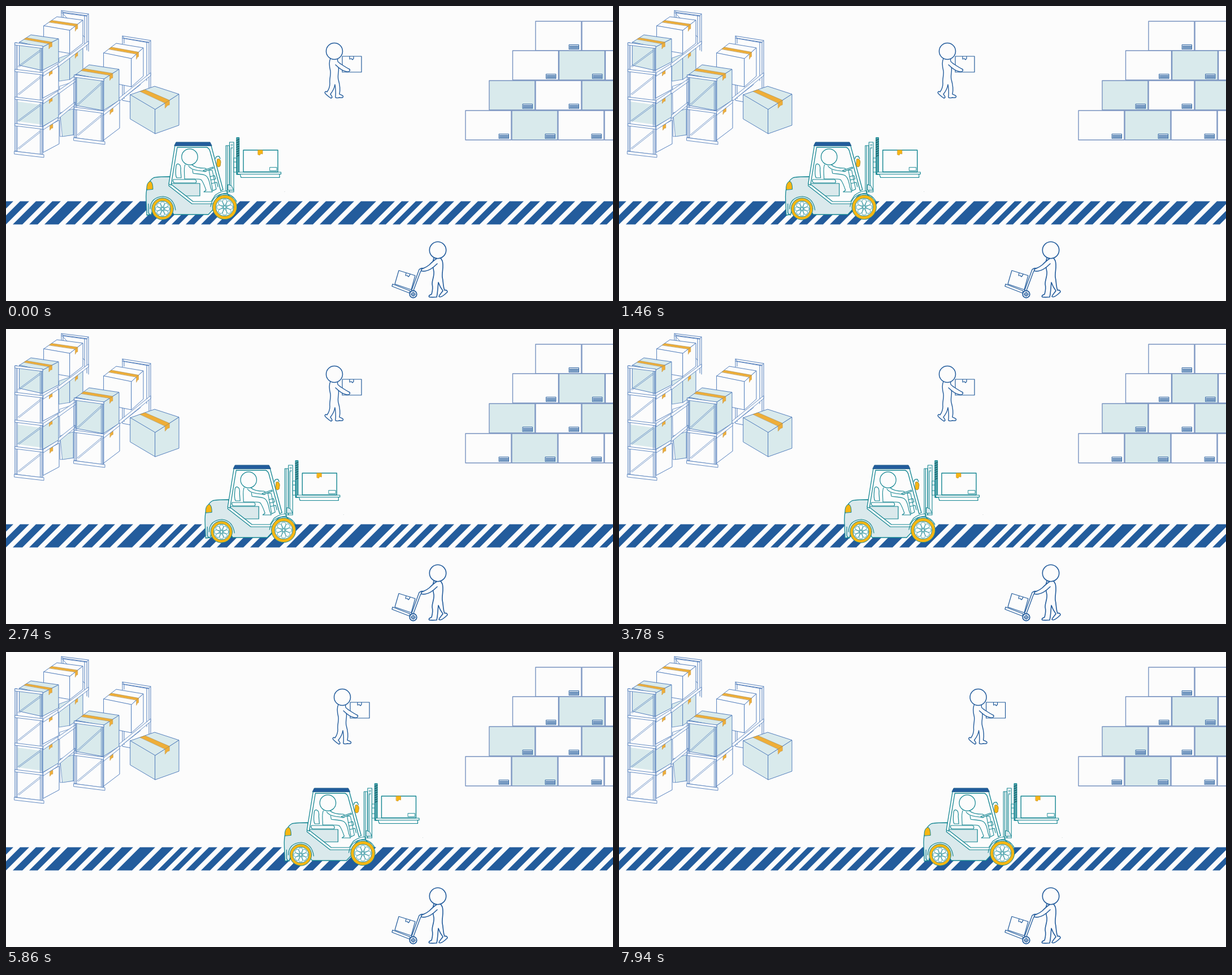
Animation, 1074 px wide and 522 px high, one loop 8000 ms. Source, as an HTML page with a canvas:

```html
<!DOCTYPE html>
<html lang="en">
<head>
<meta charset="utf-8">
<title>Warehouse</title>
<style>
html, body { margin: 0; width: 100%; height: 100%; overflow: hidden; background: #fcfcfc; }
canvas { display: block; }
</style>
</head>
<body>
<canvas id="stage" width="1074" height="522"></canvas>
<script>
const ctx = document.getElementById('stage').getContext('2d');
const PAPER = '#fcfcfc', PALE = '#d9eaec', NAVY = '#235c9c', SHELF = '#5580bd',
      TEAL = '#148692', BODY = '#dae9ec', YELLOW = '#f8b613', TAPE = '#efae38';

function shape(d, fill, stroke, width = 1) {
  const path = new Path2D(d);
  if (fill) { ctx.fillStyle = fill; ctx.fill(path); }
  if (stroke) { ctx.strokeStyle = stroke; ctx.lineWidth = width; ctx.stroke(path); }
}

function circle(x, y, r, fill, stroke, width = 1) {
  ctx.beginPath();
  ctx.arc(x, y, r, 0, Math.PI * 2);
  if (fill) { ctx.fillStyle = fill; ctx.fill(); }
  if (stroke) { ctx.strokeStyle = stroke; ctx.lineWidth = width; ctx.stroke(); }
}

const poly = points => 'M' + points.map(p => p.join()).join('L') + 'Z';
const mix = (a, b, k) => [a[0] + (b[0] - a[0]) * k, a[1] + (b[1] - a[1]) * k];
const down = (p, h) => [p[0], p[1] + h];

// Side of a box facing right, with a flap of tape at its top edge.
function boxSide(front, right, height, fill, farHeight = height) {
  shape(poly([front, right, down(right, farHeight), down(front, height)]), fill, SHELF);
  const a = mix(front, right, .42), b = mix(front, right, .6);
  shape(poly([a, b, down(b, 8), down(mix(a, b, .5), 7), down(a, 9)]), TAPE, '#c79440', .6);
}

function isoBox(left, back, right, front, height, fill, farHeight) {
  shape(poly([left, back, right, front]), fill, SHELF);
  shape(poly([left, front, down(front, height), down(left, height)]), fill, SHELF);
  boxSide(front, right, height, fill, farHeight);
  shape(poly([mix(left, back, .4), mix(left, back, .6), mix(front, right, .6), mix(front, right, .42)]),
    TAPE, '#a08a58', .6);
}

// Upright frame with a crossbar at each level; bars drop by `tilt` to the right.
function rack(x0, x1, tilt, levels) {
  const top = levels[0], bottom = levels[levels.length - 1];
  for (const [x, dy] of [[x0, 0], [x1 - 4, tilt]])
    shape(`M${x},${top + dy}h4V${bottom + dy}h-4Z M${x + 2},${top + dy}V${bottom + dy}`, null, SHELF, .9);
  levels.forEach((y, i) => {
    shape(`M${x0},${y}L${x1},${y + tilt}v4L${x0},${y + 4}Z`, PAPER, SHELF, .9);
    if (i) {
      const y0 = levels[i - 1];
      shape(`M${x0 + 5},${y - 5}L${x1 - 5},${y0 + tilt + 7}M${x0 + 7},${y - 4}L${x1 - 4},${y0 + tilt + 9}`, null, SHELF, .8);
    }
  });
  shape(`M${x0 - 1},${bottom}L${x1 + 2},${bottom + tilt}v5L${x0 - 1},${bottom + 5}Z`, PAPER, SHELF, .9);
}

function beam(x0, y0, x1, y1) {
  shape(`M${x0},${y0}L${x1},${y1}v5L${x0},${y0 + 6}Z`, PAPER, SHELF, .9);
}

function drawShelves() {
  shape('M98,24V8L146,14V80M101,22V11L143,17V78M98,8L101,11M146,14L143,17M139,18V70M98,12L143,18M101,14L139,55', null, SHELF);
  isoBox([67, 35], [90, 19], [136, 25], [113, 43], 41, PAPER);
  shape('M94,92L113,85V130L94,133Z', PALE, SHELF, .8);
  boxSide([113, 90], [136, 74], 40, PALE);
  shape('M95,142L120,134V228L96,231Z', PAPER, SHELF, .8);
  shape('M96,189L119,182V228L100,231Z', PALE, SHELF, .8);
  beam(92, 102, 146, 62);
  beam(92, 150, 124, 128);
  beam(92, 194, 122, 170);

  boxSide([66, 217], [94, 202], 42, PAPER);
  boxSide([65, 170], [93, 154], 43, PALE);
  shape('M20,169L64,175V210L20,204Z', PALE);
  boxSide([65, 121], [93, 106], 42, PAPER);
  isoBox([24, 64], [44, 51], [93, 58], [64, 73], 41, PALE);
  rack(16, 65, 6, [65, 112, 161, 208, 257]);
  beam(66, 118, 92, 102);
  beam(66, 167, 92, 150);
  beam(66, 213, 92, 197);

  shape('M206,68V53L256,61V151M209,66V57L253,64V148M206,53L209,57M256,61L253,64M249,65V132M206,57L252,65M206,132V167L222,170M209,134V164M206,164L238,139', null, SHELF);
  beam(200, 163, 256, 118);
  isoBox([173, 83], [195, 66], [243, 74], [222, 93], 50, PAPER);
  boxSide([172, 192], [201, 170], 46, PAPER);
  isoBox([124, 121], [147, 104], [200, 112], [172, 130], 55, PALE);
  rack(121, 173, 7, [122, 179, 233]);
  beam(173, 187, 201, 166);
  isoBox([220, 157], [263, 142], [306, 156], [264, 183], 43, PALE, 55);
}

function drawStack() {
  const line = '#7893c0';
  // x of the first carton, top y, and which carton is tinted
  const rows = [[937, 27, -1], [896.5, 79, 1], [855, 132, 0], [813, 185, 1]];
  rows.forEach(([x0, y, tint], row) => {
    for (let i = 0; x0 + i * 82 < 1074; i++) {
      const x = x0 + i * 82, pale = i === tint || (row === 2 && i === 2);
      shape(`M${x},${y}h81v52h-81Z`, pale ? PALE : PAPER, line, 1.4);
      const lx = x + 59.5, ly = y + 41.5;
      shape(`M${lx},${ly}h17v8h-17Z`, '#dfe7f1', NAVY, .9);
      shape(`M${lx + 1},${ly + 3}h15M${lx + 1},${ly + 5.7}h15`, null, NAVY, 1.5);
    }
  });
}

// Slanted stripes: one irregular set of right-hand edges, repeated along the road.
function drawRoad() {
  const edges = [41, 70, 97, 134, 163, 193, 225, 264, 297, 322, 347, 374, 402];
  const period = 391, gap = 12;
  let start = -18;
  const stripe = end => {
    shape(`M${start},345.5H${end}l-41,41H${start - 41}Z`, NAVY);
    start = end + gap;
  };
  stripe(13);
  for (let x = 0; x < 1100; x += period) edges.forEach(edge => stripe(x + edge));
}

function drawCarrier(dx) {
  ctx.save();
  ctx.translate(dx, 0);
  shape('M595,89H629V117H595Z M608,89v5l3,-1l2,2l2,-2v-4', PAPER, NAVY, 1.2);
  shape('M574,93C571,99 572,107 574,115C575,122 572,129 573,137C573,144 571,148 568,152' +
    'C565,150 563,153 565,155C568,158 571,161 575,163C579,162 576,159 574,156C578,151 581,146 582,139' +
    'C583,145 584,151 583,160C582,163 586,163 590,162C594,163 598,162 596,159C594,157 591,157 590,156' +
    'C592,147 590,137 588,130C586,122 590,115 588,107', PAPER, NAVY, 1.4);
  shape('M587,94C585,98 589,100 593,103C599,107 604,110 608,112C610,115 606,117 602,116C596,115 588,109 583,104', PAPER, NAVY, 1.4);
  circle(581, 80, 14.5, PAPER, NAVY, 1.5);
  ctx.restore();
}

function drawCartPusher() {
  shape('M695,468L724,477L717,502L688,492Z M708,472l-1,5l3,0l2,2l2,-2l1,-3', PAPER, NAVY, 1.2);
  shape('M684,492L715,504L714,508L683,496Z', PAPER, NAVY, 1.2);
  shape('M717,505L730,469Q731,464 737,464L742,465M720,506L733,471Q734,467 741,468', null, NAVY, 1.3);
  circle(720.5, 510, 6.3, PAPER, NAVY, 1.7);
  circle(720.5, 510, 3, null, NAVY, 1.2);
  shape('M716,510h9M720.5,506v8', null, NAVY, .9);
  shape('M757,446C754,454 755,462 757,470C758,478 754,484 754,492C756,500 754,506 753,510' +
    'C750,511 747,513 749,515C753,516 758,515 762,515C764,507 764,497 765,489' +
    'C767,495 770,500 773,504C770,508 767,511 766,514C769,517 777,510 781,506C781,503 778,502 776,503' +
    'C773,496 774,488 772,480C771,471 775,461 772,451L769,446', PAPER, NAVY, 1.6);
  shape('M762,447C757,450 753,454 749,458C743,463 738,464 735,466C733,469 738,470 742,469C750,468 758,461 763,456', PAPER, NAVY, 1.6);
  circle(764, 432, 14.7, PAPER, NAVY, 1.6);
}

function wheel(x, y, r, hub) {
  circle(x, y, r, YELLOW, TEAL, 1);
  circle(x, y, hub, PAPER, TEAL, .9);
  ctx.save();
  ctx.translate(x, y);
  for (let i = 0; i < 8; i++) {
    shape(`M0,-3C${-hub * .36},${-hub * .6} ${-hub * .28},${-hub * .9} 0,${-hub * .88}` +
      `C${hub * .28},${-hub * .9} ${hub * .36},${-hub * .6} 0,-3Z`, PAPER, TEAL, .8);
    ctx.rotate(Math.PI / 4);
  }
  ctx.restore();
  circle(x, y, 2.4, PAPER, TEAL, .9);
}

function drawDriver() {
  shape('M301,283Q302,278 306,280Q310,282 309,291L310,304H302Q299,300 301,283Z', PAPER, TEAL, 1.2);
  shape('M317,281C314,287 316,297 316,306H334C339,307 343,305 346,308C350,314 352,320 354,326' +
    'L350,329H365L362,321C360,311 358,301 351,299C344,297 335,297 331,296L330,290', PAPER, TEAL, 1.1);
  shape('M323,283C326,288 332,290 339,291L354,293M329,281C333,285 341,287 352,287L357,290', null, TEAL, 1.1);
  circle(325, 267, 14.2, PAPER, TEAL, 1.2);
  shape('M349,291L366,285L367,287L351,293Z', BODY, TEAL, 1.2);
  shape('M359,290L365,291L372,324L366,327Z M361,302l8,-2l2,6l-9,2M364,314l9,-2l2,8', PAPER, TEAL, 1.1);
  shape('M296,307H334Q338,308 336,313H298Q294,311 296,307Z', PAPER, TEAL, 1.2);
}

function drawMast() {
  shape('M389,247H395V329H389Z M391.5,247V329M395.5,241H403V329H395.5Z M398,252V326', PAPER, TEAL, 1.1);
  circle(399.4, 246, 1.3, null, TEAL, .8);
  circle(399.4, 251, 1.3, null, TEAL, .8);
  shape('M393,316l6,2l4,8h-10Z', BODY, TEAL, 1);
  shape('M403,269h5v25h-5Z M403,276h5M403,286h5', PAPER, TEAL, 1.1);
  shape('M408,233H412.5V298H408Z', '#5aa6ad', TEAL, 1.3);
  for (let y = 236; y < 268; y += 4) shape(`M408,${y + 2}l4.5,-2`, null, '#17636d', 1.4);
  shape('M410,294H486.5V297.5H412Q408,298 410,294Z M414,297.5H484V303.5H416Z', PAPER, TEAL, 1.2);
  shape('M420,255H481V293.5H420Z', PAPER, TEAL, 1.4);
  shape('M446,255h8v7l-3,-1l-2,3l-3,-1Z', YELLOW, '#c89026', .7);
  shape('M467,285.5h12v6h-12Z', PAPER, TEAL, .9);
}

function drawForklift(dx) {
  ctx.save();
  ctx.translate(dx, 0);
  // cab opening
  shape('M299,247H363L386,326L366,348H330L289,316Z', PAPER);
  drawMast();
  // rear body and chassis
  shape('M249,370L248,345C247,327 249,311 261,304Q266,302 290,302L289,317L330,349H364L372,335' +
    'Q380,328 391,329L393,334L400,340L374,352L358,369H297L280,342L263,347L257,369Z', BODY, TEAL, 1.3);
  shape('M289,314H343V336H318Z', BODY, TEAL, 1.2);
  drawDriver();
  shape('M289,313L331,346H363L370,335Q378,328 391,327V331Q381,331 374,338L366,350H329L288,318Z', PAPER, TEAL, 1.2);
  // pillars and roof
  shape('M299,247L288,315L292,317L303,250H355Q359,251 361,257L380,327L384,325L363,247Z', PAPER, TEAL, 1.3);
  shape('M298,247L301,241H361L364,247Z', NAVY, '#215f8d', 1);
  shape('M371,270Q371,265 377,266L379,270', null, TEAL, 1.3);
  shape('M374,271Q379,269 380,276L379,283Q375,287 373,282Z', YELLOW, '#a48a30', 1);
  shape('M249,325Q248,313 255,310Q260,311 260,324Z', YELLOW, TEAL, 1);
  shape('M252,350V365Q253,369 257,370M255,359Q256,338 278,337Q297,339 300,361M362,355Q366,333 387,332Q401,333 408,346', null, TEAL, 1.2);
  wheel(277, 359, 19.2, 14);
  wheel(387, 356, 21.6, 15.8);
  circle(493, 328.5, .6, '#c5cfcf');
  ctx.restore();
}

const LOOP = 8000, HOLD = 500, STEP = 80;

function draw(step) {
  ctx.fillStyle = PAPER;
  ctx.fillRect(0, 0, 1074, 522);
  ctx.lineJoin = ctx.lineCap = 'round';
  drawShelves();
  drawStack();
  drawRoad();
  drawCarrier(Math.max(0, step - 59) * 1.56);
  drawCartPusher();
  drawForklift(Math.min(step, 81) * 3.595);
}

let shown = -1;
function tick() {
  const t = performance.now() % LOOP;
  const step = t < HOLD ? 0 : Math.floor((t - HOLD) / STEP) + 1;
  if (step !== shown) draw(shown = step);
  requestAnimationFrame(tick);
}
tick();
</script>
</body>
</html>
```
